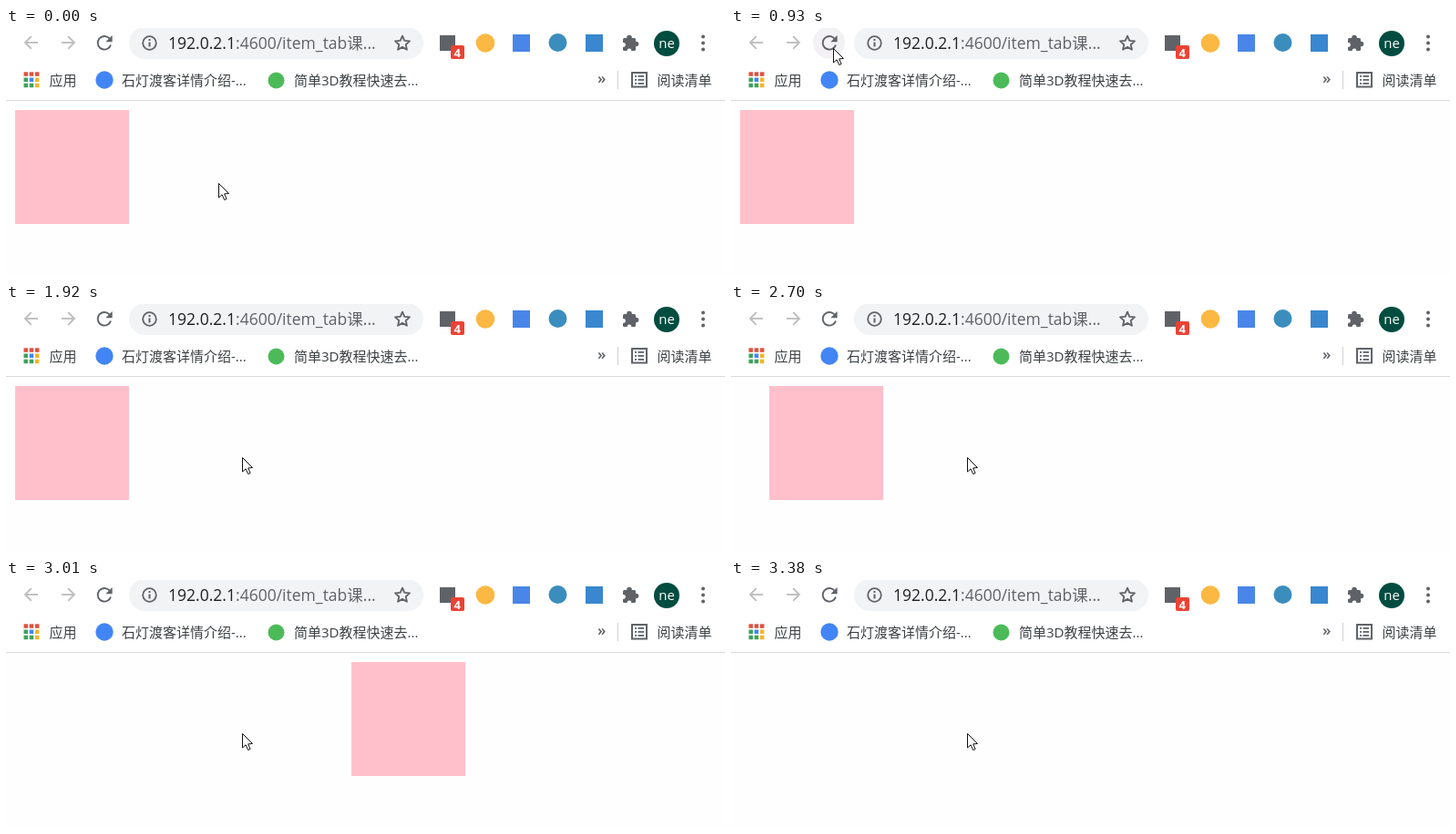
An HTML page with a canvas for the animation above (3690 ms loop, 789x272 px).

```html
<!DOCTYPE html>
<html lang="zh">
<head>
<meta charset="utf-8">
<title>Sliding box</title>
<style>
html, body { margin: 0; width: 100%; height: 100%; overflow: hidden; background: #fff; }
canvas { display: block; }
</style>
</head>
<body>
<canvas id="stage" width="789" height="272"></canvas>
<script>
const ctx = document.getElementById('stage').getContext('2d');
const LOOP = 3690;
const FONT = '"Open Sans", "Noto Sans CJK SC", "Noto Sans CJK", sans-serif';
const GREY = '#5f6368';
const INK = '#3c4043';

// Moments at which the picture is refreshed
const TICKS = [0, 380, 460, 540, 620, 690, 770, 850, 930, 1000, 1070, 1140,
  1300, 1380, 1460, 1540, 1610, 1920, 2700, 2780, 2860, 2940, 3010, 3090,
  3170, 3250, 3300, 3380];

// Left edge of the box over time
const SLIDE = [[2650, 10], [2700, 42], [2860, 195], [3010, 379], [3170, 610],
  [3250, 672], [3300, 735], [3380, 800]];

const clamp = v => Math.max(0, Math.min(1, v));
const mix = (a, b, p) => a + (b - a) * p;
const easeOut = p => 1 - (1 - p) ** 2;
const easeBoth = p => p * p * (3 - 2 * p);
const span = (t, from, to) => clamp((t - from) / (to - from));

function track(keys, t) {
  if (t <= keys[0][0]) return keys[0][1];
  for (let i = 1; i < keys.length; i++) {
    const [t0, v0] = keys[i - 1], [t1, v1] = keys[i];
    if (t <= t1) return mix(v0, v1, span(t, t0, t1));
  }
  return keys[keys.length - 1][1];
}

function bend(a, b, c, p) {
  return [0, 1].map(i => mix(mix(a[i], b[i], p), mix(b[i], c[i], p), p));
}

function pointer(t) {
  const start = [233, 170], button = [112, 22], rest = [253, 46], end = [259, 168];
  if (t < 1000) return bend(start, [310, 72], button, easeOut(span(t, 302, 930)));
  if (t < 1300) return bend(button, [190, 26], rest, easeBoth(span(t, 930, 1140)));
  return bend(rest, [253, 110], end, easeOut(span(t, 1222, 1610)));
}

function rect(x, y, w, h, color) {
  ctx.fillStyle = color;
  ctx.fillRect(x, y, w, h);
}

function round(x, y, w, h, r, color) {
  ctx.beginPath();
  ctx.roundRect(x, y, w, h, r);
  ctx.fillStyle = color;
  ctx.fill();
}

function disc(x, y, r, color) {
  ctx.beginPath();
  ctx.arc(x, y, r, 0, 7);
  ctx.fillStyle = color;
  ctx.fill();
}

function trace(points, closed) {
  ctx.beginPath();
  points.forEach(([x, y]) => ctx.lineTo(x, y));
  if (closed) ctx.closePath();
}

function line(points, color, width, closed) {
  trace(points, closed);
  ctx.strokeStyle = color;
  ctx.lineWidth = width;
  ctx.stroke();
}

function text(str, x, y, size, color, weight = 400) {
  ctx.font = `${weight} ${size}px ${FONT}`;
  ctx.fillStyle = color;
  ctx.fillText(str, x, y);
  return x + ctx.measureText(str).width;
}

function arrow(tip, dir, color) {
  line([[tip, 16], [tip + 14 * dir, 16]], color, 1.8);
  line([[tip + 6.8 * dir, 9.2], [tip, 16], [tip + 6.8 * dir, 22.8]], color, 1.8);
}

function reloadIcon() {
  ctx.beginPath();
  ctx.arc(108, 16.3, 7.3, 0.3, -0.75);
  ctx.strokeStyle = GREY;
  ctx.lineWidth = 1.9;
  ctx.stroke();
  trace([[109.3, 15.2], [116.6, 15.2], [116.6, 8]], true);
  ctx.fillStyle = GREY;
  ctx.fill();
}

function stopIcon() {
  line([[102.5, 10.5], [113.5, 21.5]], GREY, 2);
  line([[113.5, 10.5], [102.5, 21.5]], GREY, 2);
}

function addressBar() {
  round(135, -1, 323, 35, 17.5, '#f1f3f4');
  ctx.beginPath();
  ctx.arc(157.5, 16.5, 7.3, 0, 7);
  ctx.strokeStyle = GREY;
  ctx.lineWidth = 1.8;
  ctx.stroke();
  rect(156.5, 12, 2, 2, GREY);
  rect(156.5, 15.5, 2, 5, GREY);

  const x = text('192.0.2.1', 178, 23, 17.5, '#202124');
  text(':4600/item_tab课...', x, 23, 17.5, GREY);

  const star = Array.from({ length: 10 }, (_, i) => {
    const a = i * Math.PI / 5 - Math.PI / 2, r = i % 2 ? 3.9 : 8.4;
    return [435 + r * Math.cos(a), 17 + r * Math.sin(a)];
  });
  ctx.lineJoin = 'round';
  line(star, GREY, 1.8, true);
  ctx.lineJoin = 'miter';
}

function puzzle() {
  round(677, 11, 14, 14, 1.5, GREY);
  disc(684, 10.5, 2.8, GREY);
  disc(691.5, 17.5, 2.8, GREY);
  disc(677.5, 18.5, 2.4, '#fff');
  disc(684, 25, 2.4, '#fff');
}

function extensions() {
  rect(476, 8, 17, 17, GREY);
  round(488, 19, 15, 15, 2, '#ea4335');
  text('4', 491.6, 31.5, 13, '#fff', 700);
  disc(526, 16.5, 10.3, '#fbb843');
  rect(556, 7, 19, 19, '#4a86e8');
  disc(605.5, 16, 10, '#3b8dbd');
  rect(636, 7, 19, 19, '#3987cf');
  puzzle();
  disc(725, 17, 14, '#004d40');
  ctx.textAlign = 'center';
  text('ne', 725, 22, 15, '#fff');
  ctx.textAlign = 'left';
  [9.5, 16.5, 23.5].forEach(y => disc(765, y, 2, GREY));
}

function bookmarks() {
  const red = '#e2503f', green = '#3da35a', blue = '#4285f4', gold = '#f4b528';
  [red, red, red, green, blue, gold, green, green, gold].forEach((color, i) =>
    rect(19.5 + i % 3 * 6.2, 48.3 + Math.floor(i / 3) * 6.2, 4.5, 4.5, color));
  text('应用', 47.5, 63, 15, INK);

  disc(108, 57, 9.7, '#4285f4');
  text('石灯渡客详情介绍-...', 127, 63, 15, INK);
  disc(296.5, 57.5, 9, '#4cba58');
  text('简单3D教程快速去...', 316, 63, 15, INK);

  text('»', 649, 61, 17, GREY, 600);
  rect(671, 47, 1, 20, '#ced1d5');
  ctx.strokeStyle = GREY;
  ctx.lineWidth = 2;
  ctx.strokeRect(687, 49, 16, 15.5);
  [52, 56, 60].forEach(y => {
    rect(690, y, 2, 1.8, GREY);
    rect(693.5, y, 6.5, 1.8, GREY);
  });
  text('阅读清单', 714.5, 63, 15, INK);
  rect(0, 79, 789, 1, '#d8dadd');
}

function cursor(x, y) {
  ctx.save();
  ctx.translate(x + 0.5, y + 0.5);
  trace([[0, 0], [0, 15.5], [3.6, 12.3], [6.2, 18], [8.6, 17], [6.2, 11.4], [11, 11]], true);
  ctx.fillStyle = '#fff';
  ctx.fill();
  ctx.strokeStyle = '#111';
  ctx.lineWidth = 1;
  ctx.stroke();
  ctx.restore();
}

function draw(t) {
  const [x, y] = pointer(t);
  rect(0, 0, 789, 80, '#fff');
  rect(0, 80, 789, 192, '#fefefe');

  if (Math.hypot(x - 108, y - 16) < 18) disc(107.5, 16, 17.5, '#f3f1f4');
  arrow(21, 1, '#babcbe');
  arrow(75, -1, '#babcbe');
  if (t >= 1300 && t < 1920) stopIcon();
  else reloadIcon();

  addressBar();
  extensions();
  bookmarks();
  rect(Math.round(track(SLIDE, t)), 90, 125, 125, '#ffc0cb');
  cursor(Math.round(x), Math.round(y));
}

const begin = performance.now();
function frame() {
  const t = (performance.now() - begin) % LOOP;
  draw(TICKS.filter(tick => tick <= t).pop() || 0);
  requestAnimationFrame(frame);
}
frame();
</script>
</body>
</html>
```
